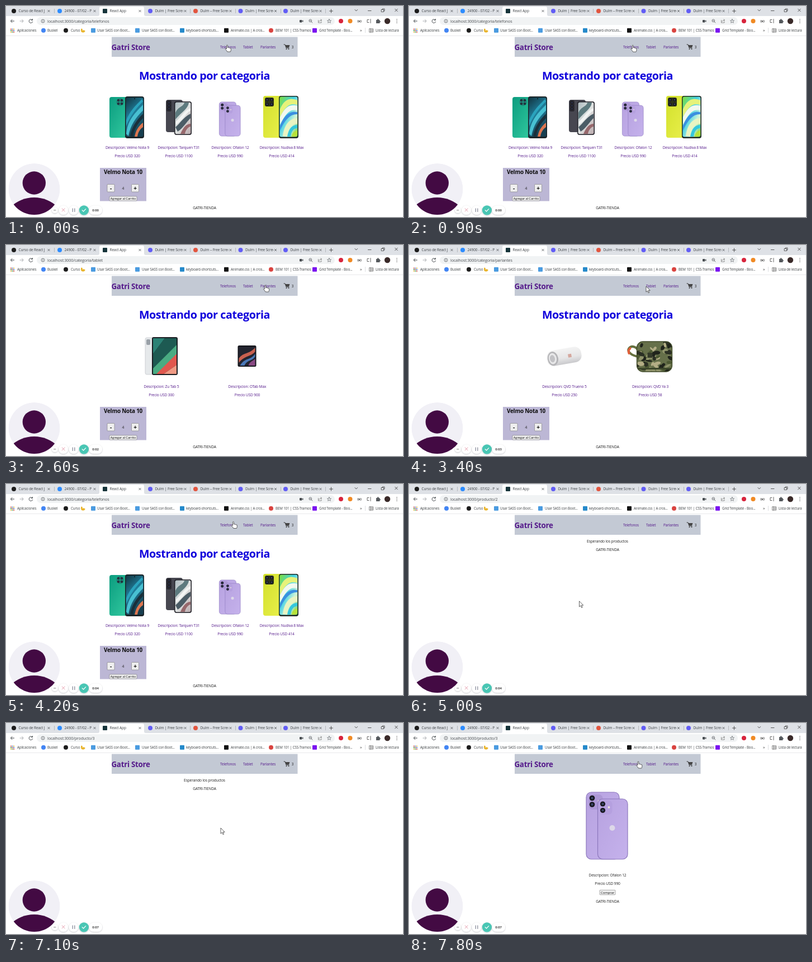
An HTML page for the animation above (8 s loop, 710x378 px).

```html
<!DOCTYPE html>
<html lang="es">
<head>
<meta charset="utf-8">
<title>Tienda</title>
<style>
html, body { margin: 0; width: 100%; height: 100%; overflow: hidden; background: #fff; }
svg { display: block; }
text { font-family: "Open Sans", "Noto Sans", sans-serif; letter-spacing: -.02em; white-space: pre; }
</style>
</head>
<body>
<svg id="stage" width="710" height="378" viewBox="0 0 710 378">
<defs>
  <linearGradient id="green" x2="1" y2="1"><stop stop-color="#0b9c7f"/><stop offset="1" stop-color="#35cda2"/></linearGradient>
  <linearGradient id="ocean" x2=".4" y2="1"><stop stop-color="#123440"/><stop offset=".5" stop-color="#1f7f9c"/><stop offset="1" stop-color="#173f50"/></linearGradient>
  <linearGradient id="mist" x2="1" y2="1"><stop stop-color="#aebcc0"/><stop offset=".5" stop-color="#e0e3e2"/><stop offset="1" stop-color="#b9a9ac"/></linearGradient>
  <linearGradient id="lilac" x2="1" y2="1"><stop stop-color="#b7a2e0"/><stop offset="1" stop-color="#c5b2ec"/></linearGradient>
  <linearGradient id="lime" x2="1" y2="1"><stop stop-color="#d2e02c"/><stop offset="1" stop-color="#eaf04c"/></linearGradient>
  <linearGradient id="neon" x2="1" y2="1"><stop stop-color="#7fe03a"/><stop offset=".4" stop-color="#3fd0e4"/><stop offset=".7" stop-color="#d3f5d8"/><stop offset="1" stop-color="#5cc84a"/></linearGradient>
  <linearGradient id="shell" x2="0" y2="1"><stop stop-color="#f3f3f3"/><stop offset=".6" stop-color="#e6e6e7"/><stop offset="1" stop-color="#c9c9cc"/></linearGradient>
  <clipPath id="bubble"><circle cx="50.5" cy="328" r="46"/></clipPath>
  <clipPath id="case"><rect x="-24" y="-26" width="63" height="54" rx="11"/></clipPath>
  <filter id="soft" x="-40%" y="-40%" width="180%" height="190%"><feDropShadow dx="0" dy=".8" stdDeviation="1.2" flood-color="#223" flood-opacity=".28"/></filter>
</defs>
<rect width="710" height="378" fill="#fff"/>
<g id="pages"></g>
<g id="chrome"></g>
<text id="url" x="74" y="29.6" font-size="7.15" fill="#4a4e52"></text>
<g id="camera"></g>
<text id="clock" x="160" y="368" font-size="5.9" font-weight="700" fill="#444" text-anchor="middle" letter-spacing="0"></text>
<path id="arrow" d="M0 0V10.2L2.4 8 4.1 11.8 5.7 11.1 4 7.4H7.2Z" fill="#fff" stroke="#222" stroke-width=".7"/>
<path id="hand" d="M-1 1C-1-.4 1-.4 1 1V4.6Q2.3 3.8 3 5 4.3 4.3 5 5.5 6.8 5 6.8 6.8V8.8Q6.8 10.4 5.8 12H.4Q-.6 10-3 7.6C-4 6.2-2.4 5.4-1 7Z" fill="#fff" stroke="#222" stroke-width=".7" stroke-linejoin="round"/>
</svg>
<script>
const $ = id => document.getElementById(id);
const LINK = '#551a8b', LOOP = 8000;

const text = (x, y, s, size = 6.65, fill = '#222', more = '') =>
  `<text x="${x}" y="${y}" font-size="${size}" fill="${fill}" ${more}>${s}</text>`;
const mid = (x, y, s, size, fill, more = '') => text(x, y, s, size, fill, 'text-anchor="middle" ' + more);
const rect = (x, y, w, h, fill, r = 0, more = '') =>
  `<rect x="${x}" y="${y}" width="${w}" height="${h}" rx="${r}" fill="${fill}" ${more}/>`;
const disc = (x, y, r, fill, more = '') => `<circle cx="${x}" cy="${y}" r="${r}" fill="${fill}" ${more}/>`;
const shape = (d, fill) => `<path d="${d}" fill="${fill}"/>`;
const line = (d, color = '#5f6368', w = .9) =>
  `<path d="${d}" fill="none" stroke="${color}" stroke-width="${w}" stroke-linecap="round" stroke-linejoin="round"/>`;
const at = (x, y, s, k = 1) => `<g transform="translate(${x} ${y}) scale(${k})">${s}</g>`;
const lens = (x, y, r) => disc(x, y, r, '#17171f') + disc(x, y, r * .45, '#3b4668');

// Camouflage blobs from a small seeded generator
function camo() {
  let seed = 11, out = '';
  const rnd = (a, b) => a + (b - a) * ((seed = seed * 16807 % 2147483647) / 2147483647);
  const inks = ['#20241c', '#8f936a', '#20241c', '#4d5a33', '#b4ae86', '#2b3024'];
  for (let i = 0; i < 60; i++) {
    const x = rnd(-24, 39), y = rnd(-26, 28);
    out += `<ellipse cx="${x}" cy="${y}" rx="${rnd(2, 7)}" ry="${rnd(1.5, 4.5)}" transform="rotate(${rnd(-50, 50)} ${x} ${y})" fill="${inks[i % 6]}"/>`;
  }
  return out;
}

// Product drawings, each centred on 0,0
const art = {
  velmo: rect(-32, -36, 38, 73, 'url(#green)', 4) + disc(-13, -27, 7, '#21877a') +
    [[-16, -30], [-10, -30], [-16, -24], [-10, -24]].map(p => lens(...p, 2.1)).join('') +
    rect(-4, -37, 34, 75, '#1b2428', 4) + rect(-2.5, -35, 31, 70, 'url(#ocean)', 3) +
    shape('M-2 30C0 8 10-4 28-22V-12C14 2 6 14 2 34Z', '#48c0d2') +
    shape('M-2 6C4-10 14-20 26-32L28-28C16-16 6-4-2 16Z', '#2aa3bd') +
    shape('M5 34C8 18 16 6 28-6V2C18 12 12 22 10 35Z', '#1a2f3a') +
    shape('M13 35C15 24 20 16 28 10V18C22 22 19 28 18 35Z', '#dd7650') + disc(13, -33, 1, '#111'),
  tarquen: rect(-23, -31, 30, 58, '#474750', 4) + rect(-22, -30, 9, 20, '#2a2a31', 3) +
    [-26, -20.5, -15].map(y => lens(-17.5, y, 2.3)).join('') +
    rect(-8, -28, 31, 60, '#1d1d24', 4) + rect(-6.5, -26.5, 28, 57, 'url(#mist)', 3) +
    shape('M-6-8C0-20 8-18 10-26H18C16-14 6-10-6 4Z', '#5d7a7e') +
    shape('M-6 18C2 12 8 0 21-6V2C14 8 8 20-2 26Z', '#4b5c66') +
    shape('M3 30C8 18 14 12 21 12V17C16 18 12 24 11 30Z', '#97686c') +
    shape('M-5 8C4 0 10-12 21-16V-12C12-6 6 6-5 14Z', '#f2f4f3'),
  ofalon: rect(-37.5, -60, 59, 120, 'url(#lilac)', 9, 'stroke="#8d78bd" stroke-width="1.2"') +
    rect(-33, -56, 25, 27, '#ad98d6', 7) + lens(-27, -49.5, 4.8) + lens(-27, -38, 4.8) + disc(-15, -44, 2, '#efe8d8') +
    rect(-17, -48, 53.5, 108, 'url(#lilac)', 9, 'stroke="#8d78bd" stroke-width="1.2"') +
    rect(-14, -45, 23, 25, '#b5a0df', 7) + lens(-8, -39, 4.6) + lens(-8, -27.5, 4.6) + disc(3, -33, 1.9, '#efe8d8') +
    disc(9, 4, 5, '#ddd8e8'),
  nudiva: rect(-33, -38, 36, 75, 'url(#lime)', 4) + rect(-30, -35, 16, 16, '#2d331c', 3) +
    [[-26, -31], [-18, -31], [-26, -23], [-18, -23]].map(p => lens(...p, 2.8)).join('') +
    rect(-5, -38, 35, 76, '#202a25', 4) + rect(-3.6, -36.5, 32, 72, 'url(#neon)', 3) +
    shape('M-3-14C4-32 16-36 28-30V-22C14-26 6-18-3 0Z', '#e6f27a') +
    shape('M-3 0C6-18 14-24 28-20V-12C14-16 6-4-3 14Z', '#f2f8ef') +
    shape('M-3 16C4-4 16-12 28-9V-5C16-6 6 4-3 24Z', '#3b8fe0') +
    shape('M2 34C4 14 14 2 28 2V12C18 12 12 20 10 34Z', '#e9f4c2') +
    shape('M10 35C12 22 18 14 28 14V20C21 20 17 26 16 35Z', '#35c7dc') +
    shape('M18 35C19 28 23 24 28 24V32Q27 35 24 35Z', '#b7e23a'),
  tab: rect(-29, -33, 36, 66, '#e6e9eb', 3, 'stroke="#b5bbc0" stroke-width=".6"') + rect(-27, -30, 7, 10, '#9aa1a8', 2) +
    rect(-17, -34, 46, 68, '#1a1d22', 3) + rect(-15, -32, 42, 64, '#163c3d', 2) +
    shape('M-15-32H6L-15-4Z', '#2b8275') + shape('M6-32H27V-20L-15 22V-4Z', '#1d5a52') +
    shape('M27-20V0L-5 32H-15V22Z', '#49ab82') + shape('M27-4V16L4 32H-9Z', '#e0574e') + shape('M27 16V32H4Z', '#f09a84'),
  charge: '<g transform="rotate(-10)">' + rect(-31, -13.5, 62, 28, 'url(#shell)', 12) +
    '<ellipse cx="-20.5" cy="1" rx="9.5" ry="12.5" fill="#b4b4b7"/><ellipse cx="-21" cy="1" rx="7" ry="10" fill="#e8e8e9"/>' +
    '<ellipse cx="-21.5" cy="1" rx="4.5" ry="6.5" fill="#c2c2c5"/>' + rect(7, -2, 6, 6, '#d5a79d') + '</g>',
  cube: line('M-21 1C-34-1-42-8-38-14C-33-20-24-16-22-10', '#65713f', 4.2) +
    line('M-38-5C-40-9-38-12-36-14', '#e2603a', 4) +
    '<g clip-path="url(#case)">' + rect(-24, -26, 63, 54, '#66704a') + camo() + rect(-24, 21, 63, 3, '#3c472b') + '</g>' +
    '<rect x="-24" y="-26" width="63" height="54" rx="11" fill="none" stroke="#414b2b" stroke-width="1.3"/>' + rect(-5, -6, 9, 9, '#343a29'),
  slate: rect(-17, -19, 33, 38, '#15161c', 2.5) + rect(-15, -17, 29, 34, '#23242f', 1) +
    shape('M-15 4C-6-8 2-2 14-15V-8C6 2-4-2-15 12Z', '#c9604f') +
    shape('M-13 17C-4 2 6 8 14-4V1C8 10 0 6-5 17Z', '#4a78b8') + shape('M2 17C5 9 10 9 14 5V17Z', '#8a4a84')
};

const items = {
  velmo: ['Velmo Nota 9', 320, art.velmo, 0, 0],
  tarquen: ['Tarquen T31', 1100, art.tarquen, 0, 0],
  ofalon: ['Ofalon 12', 990, at(0, 0, art.ofalon, .51), -.5, 3.5],
  nudiva: ['Nudiva 8 Max', 414, art.nudiva, 0, 0],
  tab: ['Zu Tab 5', 300, art.tab, 0, 0],
  charge: ['QVD Trueno 5', 250, art.charge, -.5, 0],
  slate: ['OTab Max', 900, art.slate, 0, 0],
  cube: ['QVD Ya 3', 58, art.cube, 0, 0]
};
const phones = ['velmo', 'tarquen', 'ofalon', 'nudiva'];

const card = (key, x, y) => {
  const [name, price, pic, dx, dy] = items[key];
  return at(x + dx, y + dy, pic) + mid(x, y + 57, 'Descripcion: ' + name, 6.65, LINK) +
    mid(x, y + 72.3, 'Precio USD ' + price, 6.65, LINK);
};
const heading = (x, s) => mid(x, 132, s, 19.7, '#1000dc', 'font-weight="700"');
const footer = y => mid(355, y, 'GATRI-TIENDA');
const button = (x, y, w, h, s, size, dy, more = '') =>
  rect(x, y, w, h, '#efefef', 1, 'stroke="#767676" stroke-width=".6"') + mid(x + w / 2, y + dy, s, size, '#111', more);

const header = dx => at(dx, 0,
  rect(189, 55.5, 332.5, 35.5, '#c3c9d4') + text(188.5, 79, 'Gatri Store', 13.3, LINK, 'font-weight="700"') +
  text(383, 76.3, 'Telefonos', 6.5, LINK) + text(424, 76.3, 'Tablet', 6.5, LINK) + text(455, 76.3, 'Parlantes', 6.5, LINK) +
  line('M497 69H499L501 75H506', '#333', 1) + shape('M499.3 70H507.5L506 74.5H501Z', '#444') +
  disc(501.5, 77, 1, '#333') + disc(505.5, 77, 1, '#333') + text(510.7, 76.3, '3', 6.5, '#222'));

const counter = rect(168, 290, 83, 59.5, '#bcb7d5') +
  mid(209.5, 300.6, 'Velmo Nota 10', 9.9, '#0c0c0c', 'font-weight="700"') +
  button(181, 319.5, 13, 13.5, '-', 10, 10.2, 'font-weight="700"') +
  button(224.5, 319.5, 13, 13.5, '+', 10, 10.4, 'font-weight="700"') +
  mid(209.3, 329.4, '4', 6.65) + button(185, 341, 49, 8, 'Agregar al Carrito', 5.8, 6.2);

const list = keys => {
  const xs = keys.length > 2 ? [217, 309, 401, 493] : [278, 431.5];
  return header(0) + heading(355, 'Mostrando por categoria') +
    keys.map((k, i) => card(k, xs[i], 199)).join('') + counter + footer(363.6);
};
const waiting = header(0) + mid(355, 104.8, 'Esperando los productos') + footer(120.3);
const detail = (name, price, pic) => header(0) + pic +
  mid(355, 274.6, 'Descripcion: ' + name) + mid(355, 290.3, 'Precio USD ' + price) +
  button(341, 299.3, 28, 8.4, 'Comprar', 6, 6.3) + footer(322);
const scrollbar = rect(701, 54, 9, 324, '#f1f1f1') + rect(702, 62.5, 7, 226, '#c1c1c1') +
  shape('M703.5 59.5 705.5 57 707.5 59.5ZM703.5 372.5 705.5 375 707.5 372.5Z', '#505050');

const pages = {
  telefonos: ['/categoria/telefonos', list(phones)],
  tablet: ['/categoria/tablet', list(['tab', 'slate'])],
  parlantes: ['/categoria/parlantes', list(['charge', 'cube'])],
  wait2: ['/producto/2', waiting],
  item2: ['/producto/2', detail('Tarquen T31', 1100, at(355, 184, art.tarquen, 1.96))],
  home: ['', header(-4.5) + heading(350.5, 'Hola, bienvenidos a la tienda') +
    phones.map((k, i) => card(k, 212.5 + 92 * i, 199)).join('') +
    ['tab', 'charge', 'slate', 'cube'].map((k, i) => card(k, 212.5 + 92 * i, 321)).join('') + scrollbar],
  wait3: ['/producto/3', waiting],
  item3: ['/producto/3', detail('Ofalon 12', 990, at(354.5, 184, art.ofalon))]
};
const route = [[0, 'telefonos'], [2000, 'tablet'], [2800, 'parlantes'], [3900, 'telefonos'], [4900, 'wait2'],
  [5200, 'item2'], [6100, 'home'], [7000, 'wait3'], [7300, 'item3']];

// Browser window
const cross = (x, y, r, color, w) => line(`M${x - r} ${y - r}l${2 * r} ${2 * r}m0 ${-2 * r}l${-2 * r} ${2 * r}`, color, w);
const tabs = [[14, '#1c1c1c', 'Curso de React J'], [96, '#2d8cff', '24900 - 07/02 - P'], [177, '#17343a', 'React App'],
  [258, '#625df5', 'Dulm | Free Scree'], [339, '#e2553f', 'Dulm – Free Scree'], [419.5, '#625df5', 'Dulm | Free Scree'],
  [500, '#625df5', 'Dulm | Free Scree']];
const marks = [[67, '#4285f4', 'Buskel', 74], [107, '#1c1c1c', 'Curso', 116], [156, '#4a9be0', 'Usar SASS con Boot...', 163],
  [235, '#4a9be0', 'Usar SASS con Boot...', 243], [315, '#2489ca', 'keyboard-shortcuts...', 322], [394, '#111', 'Animate.css | A cros...', 402],
  [474, '#d9433f', 'BEM 101 | CSS-Tramos', 482], [552, '#7a12f0', 'Grid Template - Boo...', 560]];
const icon = (x, y, color, square) => square ? rect(x - 4, y - 4, 8, 8, color, 1) : disc(x, y, 4, color);

$('chrome').innerHTML =
  rect(0, 0, 710, 18, '#dee1e6') + shape('M164 18Q167 18 167 15V4Q167 1 170 1H244Q247 1 247 4V15Q247 18 250 18Z', '#fff') +
  tabs.map(([x, color, s], i) => icon(x, 9, color, i == 2) +
    `<svg x="${x + 8.5}" y="0" width="50" height="17">${text(0, 11.2, s, 6.5, '#3f4347')}</svg>` +
    cross(x + 62.5, 9, 1.7, '#4a4d51', .8)).join('') +
  [86, 329, 410, 491, 571].map(x => rect(x, 5, .6, 8, '#9a9da1')).join('') +
  line('M578.5 9H584.5M581.5 6V12', '#444') + line('M624 6.5 626.3 9 628.6 6.5', '#444') + line('M647.5 8.5H653', '#333', .8) +
  line('M671.5 6.5H675.5V10.5H671.5ZM673 6.5V5H677V9H675.5', '#333', .7) + cross(698, 7.5, 2.3, '#333', .8) +
  rect(0, 18, 710, 35, '#fff') + rect(0, 52.8, 710, .7, '#dcdee1') + rect(55, 20, 533, 14, '#f1f3f4', 7) +
  line('M14.5 27H8.5L11 24.3M8.5 27 11 29.7', '#454a4e', 1) + line('M25 27H31L28.5 24.3M31 27 28.5 29.7', '#a9acb0', 1) +
  line('M47 25A3.3 3.3 0 1 0 47.6 28.2M47.4 23.3V25.3H45.3', '#454a4e', 1) +
  disc(66, 27, 3, 'none', 'stroke="#5f6368" stroke-width=".8"') + line('M66 26.8V28.4M66 25.4V25.5') +
  rect(525, 25, 4.5, 4.4, '#454a4e', .8) + shape('M529.5 27 531.5 25.3V29Z', '#454a4e') +
  disc(544.3, 26.3, 2.4, 'none', 'stroke="#5f6368" stroke-width=".8"') + line('M546.2 28.2 548 30M543.2 26.3H545.4') +
  line('M558.5 25.5V30H564V28M560 28C560 26 562 25.3 564.5 25.3M563 23.7 564.7 25.3 563 26.9', '#777', .8) +
  line('M578 23.5 579 26H581.6L579.6 27.7 580.3 30.3 578 28.8 575.7 30.3 576.4 27.7 574.4 26H577Z', '#5f6368', .7) +
  icon(599, 27, '#d8243c') + icon(615.5, 27, '#f08a24') + mid(632, 29.2, '(x)', 6, '#333', 'font-weight="700"') +
  line('M649 24.5H646V29.5H649M652 23.5V30.5', '#555') +
  shape('M662 25H664Q664 23 665.3 23T666.6 25H668.5V27Q670 27 670 28T668.5 29V31H662Z', '#54585c') +
  disc(682, 27, 5.2, '#3a2a29') + [24, 27, 30].map(y => disc(699, y, .75, '#555')).join('') +
  [0, 1, 2, 3, 4, 5, 6, 7, 8].map(i => rect(8 + i % 3 * 2.6, 40.6 + (i / 3 | 0) * 2.6, 1.8, 1.8, ['#d9493d', '#3f81e8', '#e6b32e', '#36a157'][i % 4])).join('') +
  text(20, 45.8, 'Aplicaciones', 6.2, '#3c4043') +
  marks.map(([x, color, s, tx], i) => icon(x, 43.7, color, i > 1 && i != 6) + text(tx, 45.8, s, 6.2, '#3c4043')).join('') +
  shape('M134 41Q136 39.5 137 42L136.5 44Q139 42.5 141.5 44.5 141.5 47 138 47.5 134 47.5 134 44Z', '#e9b52e') +
  text(633, 45.8, '»', 7, '#444') + rect(642, 39, .6, 9, '#c8cbce') +
  line('M650 40.7H656.5V47H650ZM652 40.7V47M652 42.8H656.5M652 45H656.5', '#555', .7) + text(661, 45.8, 'Lista de lectura', 6.2, '#3c4043');

// Presenter bubble and recorder controls
const puck = (x, r, fill = '#fff') => disc(x, 365.8, r, fill, 'filter="url(#soft)"');
$('camera').innerHTML = `<g clip-path="url(#bubble)">${disc(50.5, 328, 46, '#f1f0f6')}${disc(50.3, 317, 20.7, '#430a43')}${disc(50.3, 404, 61, '#430a43')}</g>` +
  puck(87.3, 5.3) + line('M85.5 365.8H89', '#666', .8) + puck(102.6, 8.3) + cross(102.6, 365.3, 2.5, '#e59aa9', 1) +
  puck(121, 8.3) + line('M119.2 363V368.4M122.8 363V368.4', '#8a8d9c', 1.3) +
  puck(139.4, 8.6, '#48c6b4') + line('M136.2 365.8 138.5 368 142.6 363.6', '#fff', 1.2) +
  rect(148.5, 357.8, 23.5, 16, '#fff', 8, 'filter="url(#soft)"');

$('pages').innerHTML = Object.entries(pages).map(([k, p]) => `<g id="${k}">${p[1]}</g>`).join('');

// Pointer tip: time, x, y
const trail = [[0, 395.5, 70], [700, 396, 70], [1700, 436, 72], [2200, 436, 72], [2700, 467, 72], [3000, 467, 72],
  [3400, 424, 74], [3800, 398, 71], [4000, 400, 70], [4200, 406.5, 67.5], [4800, 304.5, 209.8], [5500, 304.5, 209.8],
  [6000, 224, 66.5], [6400, 224, 66.5], [6900, 384, 188], [7400, 384, 188], [7800, 410, 69]];
const ease = u => u * u * (3 - 2 * u);
function pointer(t) {
  const i = trail.findIndex(p => p[0] > t);
  if (i < 0) return trail[trail.length - 1].slice(1);
  const [t0, x0, y0] = trail[i - 1], [t1, x1, y1] = trail[i];
  const u = ease((t - t0) / (t1 - t0));
  return [x0 + (x1 - x0) * u, y0 + (y1 - y0) * u];
}
function overLink(x, y, page) {
  const px = page == 'home' ? x + 4.5 : x;
  if (y > 66 && y < 79) return [[189, 260], [383, 411], [424.5, 441], [455, 481]].some(([a, b]) => px > a && px < b);
  const cards = page == 'home' || page == 'telefonos';
  return cards && y > 160 && y < 275 && px > 178 && px < 532;
}

function draw(time) {
  const t = Math.floor(time % LOOP / 100) * 100;
  const page = route.filter(r => r[0] <= t).pop()[1];
  for (const k in pages) $(k).style.display = k == page ? '' : 'none';
  $('url').textContent = 'localhost:3000' + pages[page][0];
  $('clock').textContent = '0:0' + Math.max(0, Math.floor((t - 100) / 1000));
  const [x, y] = pointer(t), link = overLink(x, y, page);
  $('hand').style.display = link ? '' : 'none';
  $('arrow').style.display = link ? 'none' : '';
  $(link ? 'hand' : 'arrow').setAttribute('transform', `translate(${x} ${y})`);
}
const start = performance.now();
function tick() {
  draw(performance.now() - start);
  requestAnimationFrame(tick);
}
tick();
</script>
</body>
</html>
```
